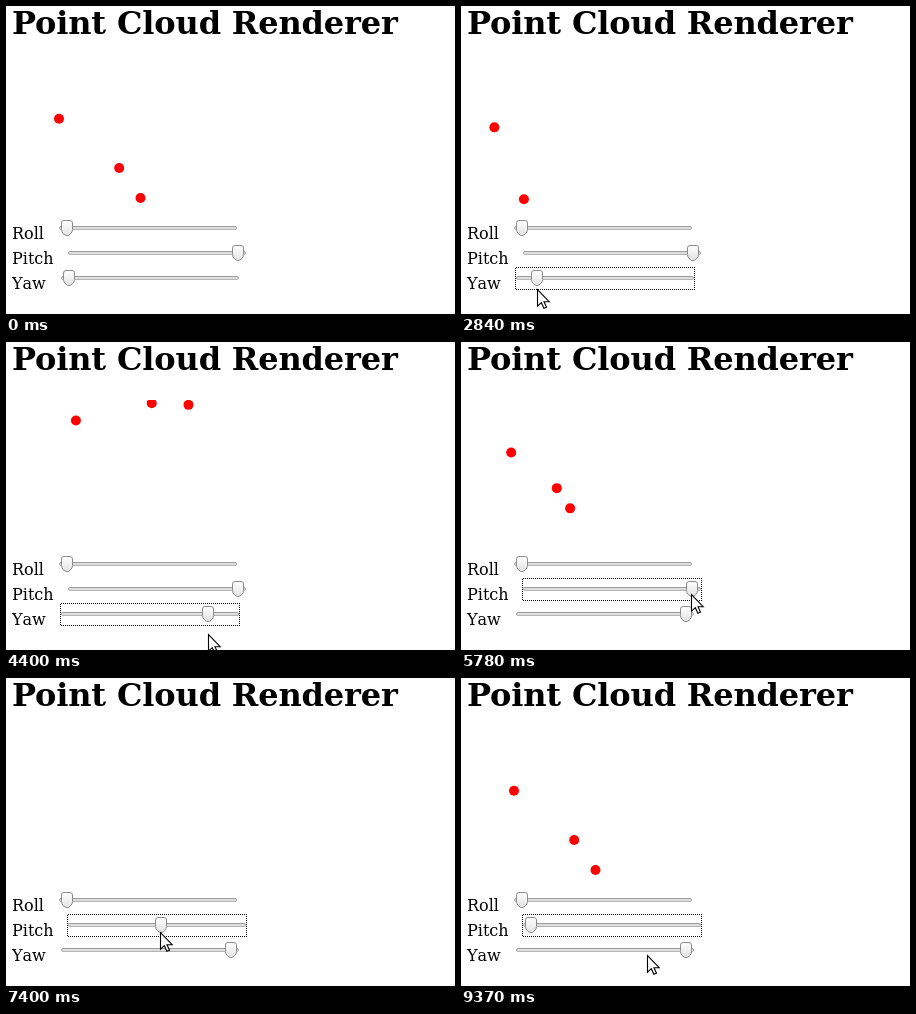
An HTML page for the animation above (9390 ms loop, 449x308 px).

```html
<!DOCTYPE html>
<html lang="en">
<head>
<meta charset="utf-8">
<title>Point Cloud Renderer</title>
<style>
  html, body { margin: 0; width: 100%; height: 100%; overflow: hidden; background: #fff; }
  svg { display: block; width: 449px; height: 308px; }
  text { font: 16px "DejaVu Serif", "Noto Serif", serif; font-kerning: none; }
  .title { font-size: 32px; font-weight: bold; font-kerning: normal; letter-spacing: -.15px; }
  .focus { fill: none; stroke: #000; stroke-dasharray: 1 1; shape-rendering: crispEdges; }
</style>
</head>
<body>
<svg viewBox="0 0 449 308">
  <defs>
    <clipPath id="view"><rect x="6" y="58" width="300" height="150"/></clipPath>
    <linearGradient id="rim" x2="0" y2="1">
      <stop stop-color="#9c9c9c"/><stop offset="1" stop-color="#b4b4b4"/>
    </linearGradient>
    <linearGradient id="face" x2="0" y2="1">
      <stop stop-color="#fff"/><stop offset="1" stop-color="#e2e2e2"/>
    </linearGradient>
  </defs>
  <text class="title" x="6" y="28">Point Cloud Renderer</text>
  <g id="cloud" clip-path="url(#view)" fill="#f00"></g>
  <g id="sliders"></g>
  <path id="cursor" d="M.5 .5V17.2L4.3 13.7L6.9 19.3L9.5 18.2L7 12.7H12.2Z" fill="#fff" stroke="#000" stroke-width="1.1"/>
</svg>
<script>
const LOOP = 9390, SHOW = 510;
const CENTER = { x: 26.3, y: 78.3 }, FOCAL = 20, TRAVEL = 162;
const POINTS = [[1.335, 1.725], [4.345, 4.185], [5.41, 5.685]];

// Mouse path: time, x, y. The sliders follow it while dragged.
const PATH = [
  [SHOW, 433, 250], [1050, 15, 160], [1190, 15, 160], [1460, 62, 210],
  [1700, 111, 252], [1880, 88, 288], [2200, 63, 281], [2510, 63, 282],
  [2840, 75.7, 283], [4400, 201.5, 292], [4780, 228, 292], [5110, 230, 292],
  [5570, 230, 252], [5780, 229.65, 252], [6200, 210.7, 254], [6350, 210.7, 254],
  [6750, 232, 255], [7280, 186, 255], [7400, 154.5, 254], [7840, 103, 260],
  [8320, 56, 265], [8970, 51, 264], [9370, 186, 277]
];
const YAW_DRAG = [2510, 4780], PITCH_DRAG = [5780, 8320];

const clamp = (v, lo, hi) => Math.min(hi, Math.max(lo, v));

function mouse(t) {
  const i = PATH.findIndex(k => k[0] >= t);
  if (i < 1) return (i ? PATH[PATH.length - 1] : PATH[0]).slice(1);
  const a = PATH[i - 1], b = PATH[i];
  const p = (t - a[0]) / (b[0] - a[0]);
  return [a[1] + (b[1] - a[1]) * p, a[2] + (b[2] - a[2]) * p];
}

// Share of the slider's travel between its resting place and the mouse
function drag(t, [start, end], rest, dir) {
  if (t < start) return 0;
  return clamp(dir * (mouse(Math.min(t, end))[0] - rest) / TRAVEL, 0, 1);
}

function make(parent, tag, attrs) {
  const el = document.createElementNS("http://www.w3.org/2000/svg", tag);
  for (const k in attrs) el.setAttribute(k, attrs[k]);
  return parent.appendChild(el);
}

function slider(name, x, y) {
  const box = document.getElementById("sliders");
  const top = y - 11, bottom = y + 12, right = x + 179;
  make(box, "text", { x: 6, y: y + 11 }).textContent = name;
  make(box, "rect", { x: x + .5, y: y - 1.5, width: 177, height: 3, rx: 1.5, fill: "#dedede", stroke: "url(#rim)" });
  const ring = make(box, "path", {
    class: "focus",
    d: `M${x} ${top + .5}H${right}M${x} ${bottom - .5}H${right}` +
       `M${x - .5} ${top + 1}V${bottom}M${right - .5} ${top}V${bottom}`
  });
  const knob = make(box, "path", {
    d: "M-3-7.5H3Q5.5-7.5 5.5-5V1.5Q5.5 4 3.8 5.5Q1.5 7.7 0 7.7Q-1.5 7.7-3.8 5.5Q-5.5 4-5.5 1.5V-5Q-5.5-7.5-3-7.5Z",
    fill: "url(#face)", stroke: "#8c8c8c"
  });
  return (share, focused) => {
    knob.setAttribute("transform", `translate(${Math.round(x + 8 + TRAVEL * share)} ${y})`);
    ring.style.display = focused ? "" : "none";
  };
}

const roll = slider("Roll", 53, 222);
const pitch = slider("Pitch", 62, 247);
const yaw = slider("Yaw", 55, 272);
const cursor = document.getElementById("cursor");
const dots = POINTS.map(() => make(document.getElementById("cloud"), "circle", { r: 5 }));

function project([px, py], a, b) {
  const x = px * Math.cos(a) - py * Math.sin(a);
  const y = px * Math.sin(a) + py * Math.cos(a);
  const z = Math.cos(b) + x * Math.sin(b) || 1e-6;
  return [
    CENTER.x + FOCAL * (x * Math.cos(b) - Math.sin(b)) / z,
    CENTER.y + FOCAL * y / z
  ];
}

function draw(t) {
  const yawShare = drag(t, YAW_DRAG, 63, 1);
  const pitchShare = drag(t, PITCH_DRAG, 231, -1);
  const turn = 2 * Math.PI;

  POINTS.forEach((p, i) => {
    const [x, y] = project(p, yawShare * turn, pitchShare * turn);
    dots[i].setAttribute("cx", x.toFixed(2));
    dots[i].setAttribute("cy", y.toFixed(2));
  });
  const onPitch = t >= PITCH_DRAG[0];
  roll(0, false);
  pitch(1 - pitchShare, onPitch);
  yaw(yawShare, t >= YAW_DRAG[0] && !onPitch);

  const [mx, my] = mouse(t).map(Math.round);
  cursor.style.display = t < SHOW ? "none" : "";
  cursor.setAttribute("transform", `translate(${mx} ${my})`);
}

const begin = performance.now();
function tick() {
  draw((performance.now() - begin) % LOOP);
  requestAnimationFrame(tick);
}
tick();
</script>
</body>
</html>
```
